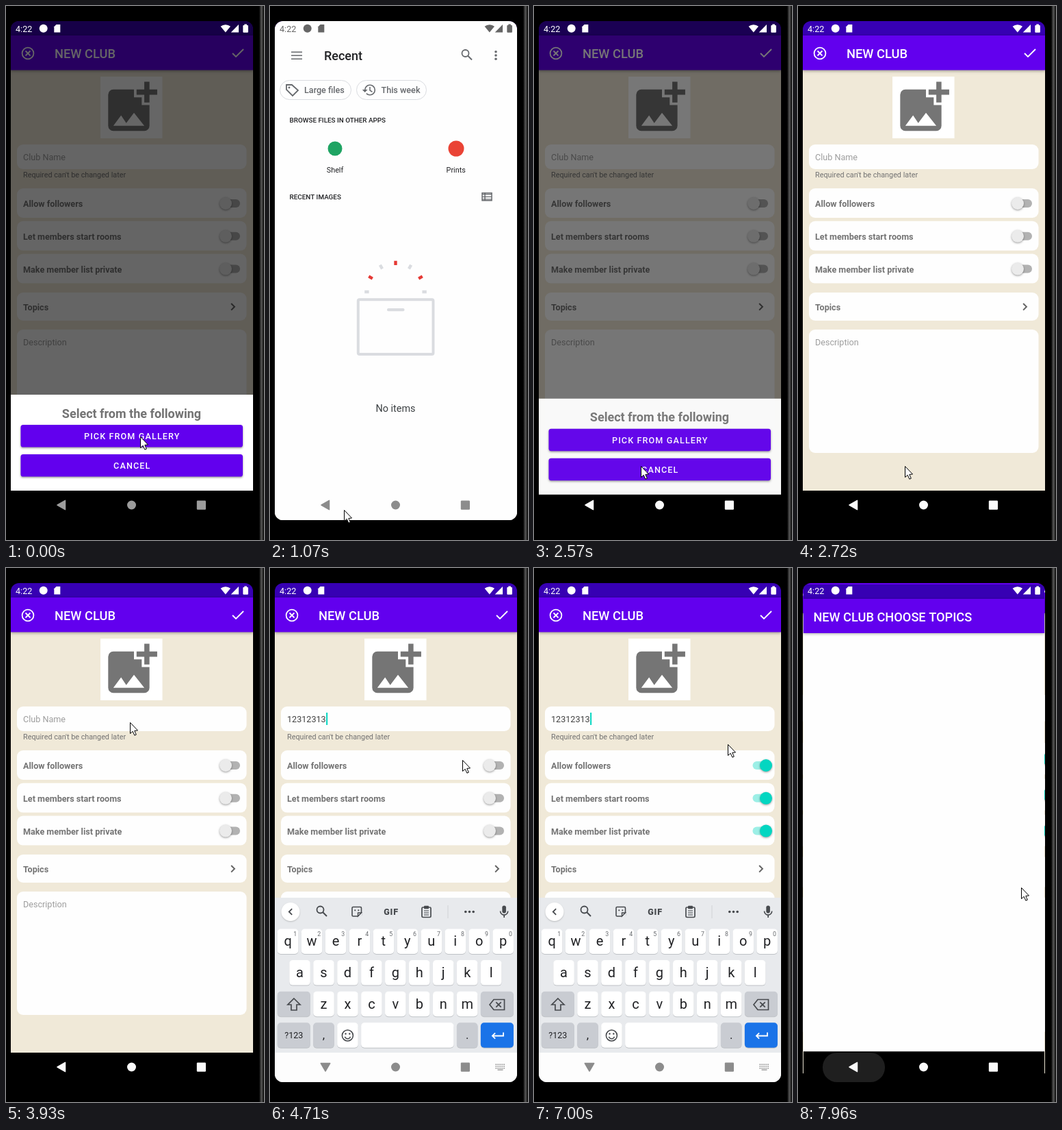
These frames come from a looping animation (377x779 px, 7990 ms). An HTML page with a canvas:

```html
<!DOCTYPE html>
<html lang="en">
<head>
<meta charset="utf-8">
<title>New club screen</title>
<style>
  html, body { margin: 0; width: 100%; height: 100%; overflow: hidden; background: #000; }
  canvas { display: block; width: 377px; height: 779px; }
</style>
</head>
<body>
<canvas id="stage" width="377" height="779"></canvas>
<script>
const ctx = document.getElementById('stage').getContext('2d');
const LOOP = 7990;
const PURPLE = '#6200ee', TEAL = '#03d6c1', GREY = '#737373', INK = '#202124';
const SOFT = '#66696d', DARK = '#474a4e', PALE = '#dadce0';

const clamp = v => Math.max(0, Math.min(1, v));
const span = (t, from, to) => clamp((t - from) / (to - from));
const smooth = p => p * p * (3 - 2 * p);
const easeOut = p => p * (2 - p);
const rowY = i => 288 + 47.8 * i;
const toggleStart = i => 5690 + 300 * i;

// Drawing helpers
function paint(fill, stroke, width = 1) {
  if (fill) { ctx.fillStyle = fill; ctx.fill(); }
  if (stroke) { ctx.strokeStyle = stroke; ctx.lineWidth = width; ctx.stroke(); }
}
function box(x, y, w, h, r, fill, stroke, width) {
  ctx.beginPath();
  ctx.roundRect(x, y, w, h, r);
  paint(fill, stroke, width);
}
function dot(x, y, r, fill, stroke, width) {
  box(x - r, y - r, 2 * r, 2 * r, r, fill, stroke, width);
}
function arc(x, y, r, from, to, color, width = 1.6) {
  ctx.beginPath();
  ctx.arc(x, y, r, from * Math.PI, to * Math.PI);
  paint(null, color, width);
}
function poly(points, fill, stroke, width, closed = !!fill) {
  ctx.beginPath();
  for (let i = 0; i < points.length; i += 2) ctx.lineTo(points[i], points[i + 1]);
  if (closed) ctx.closePath();
  paint(fill, stroke, width);
}
function label(str, x, y, size, color, weight = 400, align = 'left', spacing = 0) {
  ctx.font = `${weight} ${size}px Roboto, sans-serif`;
  ctx.letterSpacing = spacing + 'px';
  ctx.textAlign = align;
  ctx.fillStyle = color;
  ctx.fillText(str, x, y);
  ctx.letterSpacing = '0px';
}
function placed(x, y, draw, scale = 1, turn = 0) {
  ctx.save();
  ctx.translate(x, y);
  ctx.rotate(turn * 2 * Math.PI);
  ctx.scale(scale, scale);
  draw();
  ctx.restore();
}
function shadowed(alpha, blur, dy, draw) {
  ctx.save();
  ctx.shadowColor = `rgba(0,0,0,${alpha})`;
  ctx.shadowBlur = blur;
  ctx.shadowOffsetY = dy;
  draw();
  ctx.restore();
}
function zoomed(scale, alpha, draw) {
  ctx.save();
  ctx.globalAlpha = alpha;
  placed(184, 386, () => { ctx.translate(-184, -386); draw(); }, scale);
  ctx.restore();
}

// Small icons
function chevron(x, y, r, turn, color, width = 1.8) {
  placed(x, y, () => poly([-r / 2, -r, r / 2, 0, -r / 2, r], null, color, width), 1, turn);
}
function cross(x, y, r, color) {
  poly([x - r, y - r, x + r, y + r], null, color, 1.8);
  poly([x + r, y - r, x - r, y + r], null, color, 1.8);
}
function magnifier(x, y, color) {
  dot(x - 2, y - 2, 5, null, color, 1.8);
  poly([x + 1.5, y + 1.5, x + 7.5, y + 7.5], null, color, 2);
}
function dots(x, y, dx, dy, color) {
  for (let i = -1; i <= 1; i++) dot(x + i * dx, y + i * dy, 1.8, color);
}
function bars(x, y, w, gap, thick, color) {
  for (let i = -1; i <= 1; i++) box(x, y + i * gap - thick / 2, w, thick, 0, color);
}
function photoIcon() {
  const grey = '#757575';
  box(3, 5, 16, 16, 2, grey);
  box(13, 2, 9, 6, 0, '#fff');
  box(16, 2, 6, 9, 0, '#fff');
  box(17, 2, 2, 8, 0, grey);
  box(14, 5, 8, 2, 0, grey);
  poly([5, 19, 8, 15, 10, 18, 13, 14, 17, 19], '#fff');
}

// Screens
function page(color) {
  box(7, 22, 354, 728, 0, '#000');
  box(7, 93, 354, 614, 0, color);
}
function appBar(title, x) {
  box(7, 22, 354, 22, 0, '#3700b3');
  shadowed(.35, 4, 1, () => box(7, 43, 354, 50.5, 0, PURPLE));
  label(title, x, 76, 18.3, '#fff', 500);
}
function card(y, h) {
  box(16, y, 335.5, h, 9, '#fefefe');
}
function toggle(y, on) {
  const lit = on > .5;
  box(319.5, y - 6, 22.5, 12, 6, lit ? '#9cefe6' : '#b2b2b2');
  shadowed(.4, 3, 1, () => dot(321 + 18 * on, y, 9, lit ? TEAL : '#ebebeb'));
}

function form(t) {
  page('#f0e9d8');
  appBar('NEW CLUB', 71);
  dot(32, 69, 8.4, null, '#fff', 1.8);
  cross(32, 69, 3.5, '#fff');
  poly([331, 69, 336, 74, 347, 63], null, '#fff', 1.9);
  box(138, 103, 90.5, 90, 0, '#fff');
  placed(138, 103, photoIcon, 3.77);

  card(202, 36);
  const typed = '12312313'.slice(0, Math.floor(8 * span(t, 4400, 4690)));
  label(typed || 'Club Name', 25, 225, 12.6, typed ? '#404040' : '#9e9e9e');
  if (t > 4100 && Math.floor((t - 4600) / 500) % 2 === 0) {
    box(25 + (typed && ctx.measureText(typed).width + .5), 211, 2, 18, 0, TEAL);
  }
  label("Required can't be changed later", 25, 249.5, 10.8, GREY);

  ['Allow followers', 'Let members start rooms', 'Make member list private'].forEach((name, i) => {
    card(rowY(i) - 22, 43);
    label(name, 25, rowY(i) + 5, 12.6, GREY, 700);
    toggle(rowY(i), smooth(span(t, toggleStart(i), toggleStart(i) + 90)));
  });
  card(418, 41);
  label('Topics', 25, 444, 12.6, GREY, 700);
  chevron(331.5, 438.8, 4.8, 0, '#666', 2);
  card(472, 180);
  label('Description', 25, 495, 12.6, '#9e9e9e');
}

function button(text, y, ripple, x) {
  shadowed(.4, 3, 1.5, () => box(21.5, y, 324.5, 32.5, 3.6, PURPLE));
  if (ripple > 0 && ripple < 1) {
    ctx.save();
    ctx.clip();
    dot(x, y + 17, 20 + 260 * ripple, `rgba(255,255,255,${.26 * (1 - ripple)})`);
    ctx.restore();
  }
  label(text, 184.3, y + 21, 12.6, '#fff', 500, 'center', 1.12);
}

function formWithDialog(t) {
  form(t);
  if (t > 2690) return;
  box(7, 22, 354, 728, 0, `rgba(0,0,0,${.6 * (1 - span(t, 2556, 2690))})`);
  const exit = span(t, 2546, 2666) ** 2;
  ctx.save();
  ctx.globalAlpha *= 1 - exit;
  ctx.translate(0, 130 * exit);
  box(7, 567, 354, 140, 0, '#fff');
  label('Select from the following', 183.5, 600.5, 18, GREY, 700, 'center');
  button('PICK FROM GALLERY', 611, span(t, 30, 300), 197);
  button('CANCEL', 654, span(t, 2430, 2560), 157);
  ctx.restore();
}

function gallery() {
  box(7, 22, 354, 728, 0, '#fefefe');
  bars(31, 72.3, 16, 5, 1.6, SOFT);
  label('Recent', 79, 79, 18, INK, 500);
  magnifier(287.5, 71, SOFT);
  dots(330, 72, 0, 5.3, SOFT);

  box(14.5, 108.5, 104, 28, 14, null, PALE);
  box(126.5, 108.5, 102, 28, 14, null, PALE);
  label('Large files', 50, 127, 12.6, SOFT, 500);
  label('This week', 162.5, 127, 12.6, SOFT, 500);
  poly([24, 115, 32, 115, 41, 123, 33, 131, 24, 122], null, SOFT, 1.8, true);
  dot(28, 119, 1.4, SOFT);
  arc(146, 122.5, 7.3, 1, 2.75, SOFT);
  poly([134.8, 122, 142.6, 122, 138.7, 126], SOFT);
  poly([146, 118, 146, 123, 149.5, 125.3], null, SOFT, 1.5);

  label('BROWSE FILES IN OTHER APPS', 28.5, 169.7, 9.9, INK, 500);
  dot(95, 208, 10.5, '#1fa463');
  dot(272, 208, 11.5, '#ea4335');
  label('Shelf', 95, 242.7, 10.8, INK, 400, 'center');
  label('Prints', 271.7, 242.7, 10.8, INK, 400, 'center');
  label('RECENT IMAGES', 28.5, 282, 9.9, INK, 500);
  box(310, 272.7, 14, 11, 0, null, SOFT, 1.5);
  box(313.3, 272, 1.5, 12, 0, SOFT);
  bars(310, 278.3, 14, 3.6, 1.2, SOFT);

  box(128.8, 428.3, 109.7, 79.7, 2, null, PALE, 4);
  box(171, 441, 25.5, 4.3, 2, PALE);
  for (let i = -3; i <= 3; i++) {
    placed(183.5, 417, () => box(-2.2, -45.3, 4.4, 6.4, 0, i % 2 ? PALE : '#e53935'), 1, i / 12);
  }
  label('No items', 183.5, 591.5, 14.4, '#3c4043', 400, 'center');
}

function topics() {
  page('#fefefe');
  appBar('NEW CLUB CHOOSE TOPICS', 21.5);
}

// Keyboard, laid out on a grid of ten columns
const PITCH = 34.95;
const keyX = col => 10.8 + PITCH * col;
const keyY = row => 526.5 + 45.6 * row;

function key(col, row, cols = 1, text = '', fill = '#fff', size = 20) {
  const x = keyX(col), y = keyY(row), w = PITCH * cols - 4.4;
  box(x, y + 1, w, 36.5, 5, '#bfc2c6');
  box(x, y, w, 36.5, 5, fill);
  label(text, x + w / 2, y + 18 + size * .34, size, INK, 400, 'center');
}

function keyboardTools() {
  shadowed(.2, 2, 1, () => dot(30, 501.5, 13.5, '#fff'));
  chevron(30, 501.5, 4.4, .5, DARK);
  magnifier(75.5, 500.5, DARK);
  box(120, 494.5, 13.5, 13.5, 1.5, null, DARK, 1.6);
  poly([134.5, 503, 128.5, 503, 128.5, 509, 134.5, 509], '#e8eaed');
  poly([133.5, 503, 128.5, 508, 128.5, 503], null, DARK, 1.4, true);
  dot(124.3, 499.3, 1.1, DARK);
  dot(129.3, 499.3, 1.1, DARK);
  label('GIF', 177, 506, 12.5, DARK, 900, 'center', .8);
  box(222, 495, 13, 14.5, 1.5, null, DARK, 1.7);
  box(225, 492.8, 7, 4.5, 1, DARK);
  bars(225, 503, 7, 3, 1.2, DARK);
  box(259.5, 492, 1, 19, 0, '#cfd1d5');
  dots(291.5, 501.5, 5.7, 0, DARK);
  box(339.3, 492.5, 5.6, 11, 2.8, DARK);
  arc(342.1, 500.5, 5.6, 0, 1, DARK);
  box(341.3, 506, 1.7, 4, 0, DARK);
}

function keyboard(dy) {
  const mod = '#c9ccd2';
  ctx.save();
  ctx.translate(0, dy);
  box(7, 481, 354, 269, 0, '#e8eaed');
  keyboardTools();

  ['qwertyuiop', 'asdfghjkl', 'zxcvbnm'].forEach((letters, row) => {
    const indent = (10 - letters.length) / 2;
    [...letters].forEach((c, i) => {
      key(indent + i, row, 1, c);
      if (row === 0) label((i + 1) % 10, keyX(i) + 26, 537, 8.8, SOFT, 400, 'center');
    });
  });
  key(0, 2, 1.5, '', mod);
  poly([35, 628, 44, 637, 39, 637, 39, 645, 31, 645, 31, 637, 26, 637], null, DARK, 1.7, true);
  key(8.5, 2, 1.5, '', mod);
  poly([321, 637, 327, 629.5, 342.5, 629.5, 342.5, 644.5, 327, 644.5], null, DARK, 1.7, true);
  cross(334, 637, 3.7, DARK);

  key(0, 3, 1.5, '?123', mod, 12.6);
  key(1.5, 3, 1, ',', mod, 17);
  key(2.5, 3);
  dot(113.4, 682, 8, null, DARK, 1.6);
  dot(110.5, 679.5, 1.2, DARK);
  dot(116.3, 679.5, 1.2, DARK);
  arc(113.4, 682.5, 4.3, .1, .9, DARK);
  key(3.5, 3, 4);
  key(7.5, 3, 1, '.', mod, 17);
  key(8.5, 3, 1.5, '', '#1a73e8');
  poly([341, 677.5, 341, 682.5, 325, 682.5], null, '#fff', 1.8);
  chevron(327, 682.5, 4.2, .5, '#fff');
  box(7, 707, 354, 43, 0, '#fdfdfd');
  ctx.restore();
}

// System parts
function statusBar(color) {
  label('4:22', 14, 37.7, 12.6, color);
  dot(54.7, 32.8, 6, color);
  poly([73.5, 27, 79.3, 27, 79.3, 38.5, 70.3, 38.5, 70.3, 30.3], color);
  ctx.beginPath();
  ctx.moveTo(320.8, 38.5);
  ctx.arc(320.8, 38.5, 11.3, -Math.PI * .72, -Math.PI * .28);
  ctx.fill();
  poly([340, 27, 340, 38.5, 328.7, 38.5], color);
  box(346.3, 28, 7.6, 10.7, 1, color);
  box(348.3, 26.5, 3.6, 2, 0, color);
}

function navBar(t, light, color, keysUp) {
  const press = t < 2000 ? span(t, 1425, 1500) * (1 - span(t, 1540, 1650)) : span(t, 7880, 7950);
  if (press > 0) {
    const w = 45 + 46 * press, tone = light ? 0 : 255;
    box(81.5 - w / 2, 707, w, 43, 21, `rgba(${tone},${tone},${tone},${.12 * press})`);
  }
  ctx.lineJoin = 'round';
  placed(81, 728, () => poly([-6, 0, 5.5, -6.7, 5.5, 6.7], color, color, 1.5), 1, keysUp ? -.25 : 0);
  ctx.lineJoin = 'miter';
  dot(183.5, 728, 6.5, color);
  box(278.8, 721.5, 13.2, 13.2, 1.2, color);
  if (!keysUp) return;
  for (let i = 0; i < 15; i++) {
    box(329.5 + 2.9 * (i % 5), 723.5 + 2.7 * Math.floor(i / 5), 1.7, 1.5, 0, color);
  }
  box(332.5, 731.5, 8, 1.3, 0, color);
}

// Pointer moves: start, end, x, y; it rests in between
const MOVES = [
  [60, 450, 50, 740],
  [630, 1050, 108, 735],
  [1170, 1370, 82, 726],
  [1790, 2290, 156, 671],
  [2860, 3010, 208, 367],
  [3160, 3270, 183, 303],
  [3430, 3800, 181, 225],
  [4260, 4700, 281, 280],
  [5060, 5300, 305, 624],
  ...[0, 1, 2].map(i => [toggleStart(i) - 200, toggleStart(i) - 30, 326, rowY(i)]),
  [6450, 6650, 328, 442],
  [6830, 6990, 283, 257],
  [7030, 7190, 328, 442],
  [7490, 7900, 326, 466]
];

function pointer(t) {
  let x = 196, y = 628;
  for (const [from, to, nextX, nextY] of MOVES) {
    const p = smooth(span(t, from, to));
    x += (nextX - x) * p;
    y += (nextY - y) * p;
  }
  placed(x + .5, y + .5, () => {
    poly([0, 0, 0, 16, 3.7, 12.8, 6.4, 18.7, 8.8, 17.6, 6.3, 11.9, 11, 11.5], '#fff', '#000', 1);
  });
}

function bezel() {
  const shade = ctx.createLinearGradient(370, 0, 377, 0);
  ['#000', '#333', '#555', '#2a2a2a', '#0a0a0a'].forEach((c, i) => shade.addColorStop(i / 4, c));
  box(370, 0, 7, 779, 0, shade);
}

function draw(t) {
  box(0, 0, 377, 779, 0, '#000');
  bezel();
  const galleryIn = easeOut(span(t, 660, 860)), galleryOut = easeOut(span(t, 1800, 1980));
  const inGallery = galleryIn > 0 && galleryOut < 1;
  const topicsOut = span(t, 7950, 8150);
  const inTopics = t >= 7230;
  const keysUp = t > 4180 && !inTopics;
  const keyRise = keysUp ? easeOut(span(t, 4250, 4400)) : 0;

  ctx.save();
  ctx.beginPath();
  ctx.roundRect(7, 22, 354, 728, 12);
  ctx.clip();
  if (inTopics) {
    zoomed(1.1 - .1 * topicsOut, 1, () => form(t));
    zoomed(1 - .1 * topicsOut, 1, topics);
  } else {
    const backScale = galleryOut > 0 ? 1.1 - .1 * galleryOut : 1 + .15 * galleryIn;
    zoomed(backScale, 1, () => formWithDialog(t));
    if (inGallery) {
      const alpha = span(t, 670, 730) * (1 - span(t, 1815, 1900));
      zoomed(.85 + .15 * galleryIn - .1 * galleryOut, alpha, gallery);
    }
  }
  if (keyRise > 0) keyboard(269 * (1 - keyRise));

  const lightPage = inGallery && galleryIn > .5 && galleryOut < .5;
  const lightNav = lightPage || keyRise > .8;
  statusBar(lightPage ? '#666' : '#fff');
  navBar(t, lightNav, lightNav ? '#8c8c8c' : t < 2556 ? '#9c9c9c' : '#fafafa', keysUp);
  ctx.restore();
  pointer(t);
}

function tick() {
  draw(performance.now() % LOOP);
  requestAnimationFrame(tick);
}
tick();
</script>
</body>
</html>
```
